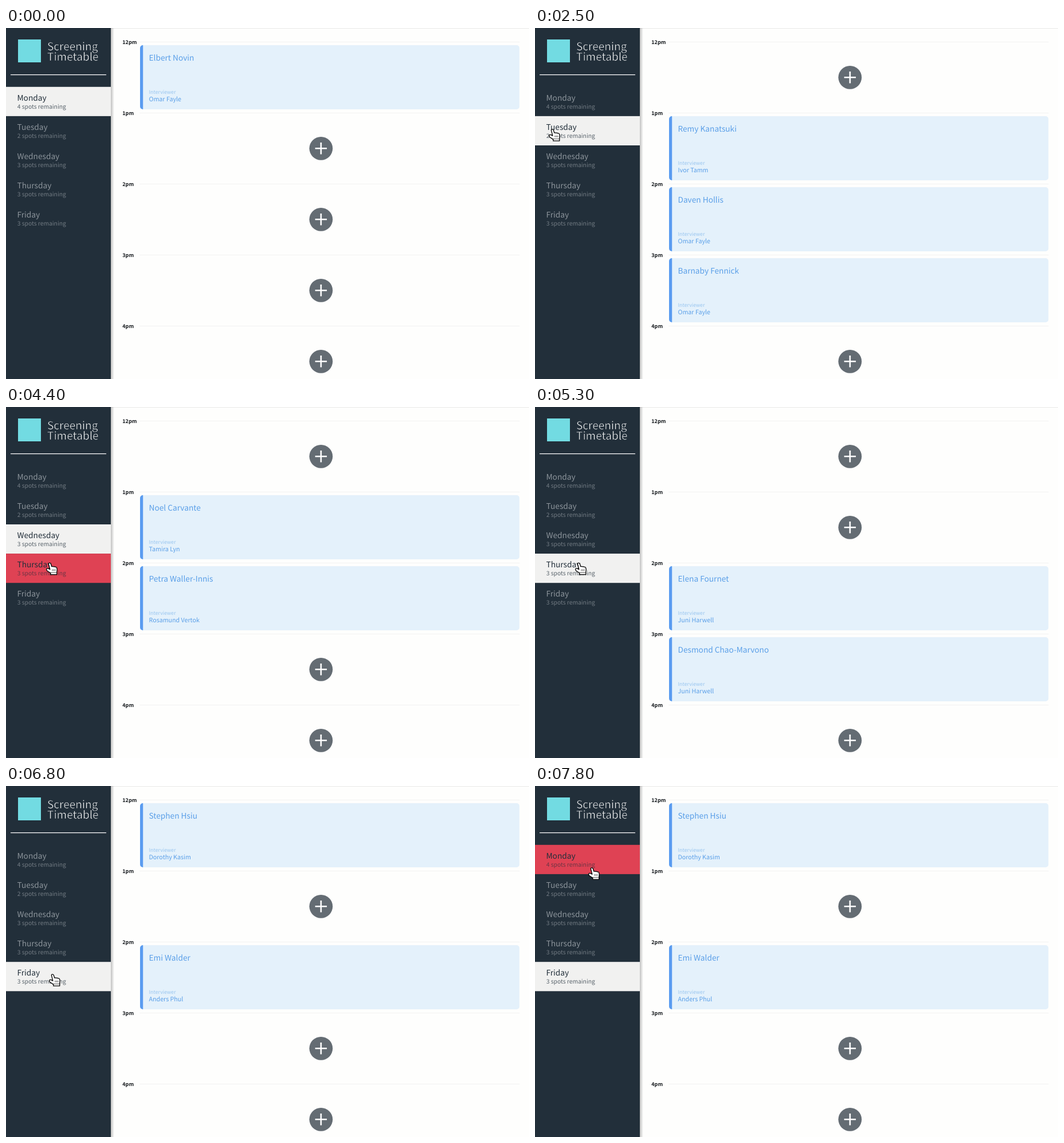
Write an HTML page that moves like this. It is 913 by 613 pixels and loops after 8 s.

```html
<!DOCTYPE html>
<html lang="en">
<head>
<meta charset="utf-8">
<title>Screening Timetable</title>
<style>
  html, body { margin: 0; width: 100%; height: 100%; overflow: hidden; background: #fefefd; }
  svg { display: block; width: 100vw; height: 100vh; }
  text {
    font-family: "Noto Sans CJK JP", "Noto Sans CJK SC", "Noto Sans CJK KR", "Noto Sans CJK", "Noto Sans", sans-serif;
    text-rendering: geometricPrecision;
  }
  .title { font-size: 19px; font-weight: 300; fill: #fff; stroke: #222f3a; stroke-width: .6px; }
  .hour { font-size: 9px; font-weight: 700; fill: #14181c; }
  .name { font-size: 13.7px; fill: #5a9fe8; }
  .label { font-size: 8.8px; font-weight: 300; fill: #98c5ef; }
  .host { font-size: 10.7px; fill: #5a9fe8; }
  .day { font-size: 13.7px; fill: #8c949b; }
  .spots { font-size: 10.3px; font-weight: 300; fill: #727b83; }
  .box { fill: none; }
  .hover .box { fill: #df4254; }
  .hover .day { fill: #222f3a; }
  .hover .spots { fill: #6c3544; }
  .selected .box { fill: #f1f1f0; }
  .selected .day { fill: #222f3a; }
  .selected .spots { fill: #59636b; }
</style>
</head>
<body>
<svg viewBox="0 0 913 613" preserveAspectRatio="none">
  <defs>
    <linearGradient id="shade">
      <stop offset="0" stop-color="#000" stop-opacity=".24"/>
      <stop offset="1" stop-color="#000" stop-opacity="0"/>
    </linearGradient>
    <clipPath id="round"><rect x="234" width="662.3" height="112" rx="5"/></clipPath>
    <g id="add">
      <circle r="20.4" fill="#646c73"/>
      <path d="M-10.2 0H10.2M0-10.2V10.2" stroke="#fff" stroke-width="2.6"/>
    </g>
  </defs>
  <rect width="913" height="613" fill="#fefefd"/>
  <rect width="913" height="1" fill="#e8e8e8"/>
  <g id="hours"></g>
  <g id="schedules"></g>
  <rect x="183" width="6" height="613" fill="url(#shade)"/>
  <rect width="183" height="613" fill="#222f3a"/>
  <rect x="21" y="20" width="40" height="40" fill="#72dbe2"/>
  <text class="title" x="72" y="38.6">Screening</text>
  <text class="title" x="72" y="57">Timetable</text>
  <path d="M8 81.6H175" stroke="#fff" stroke-width="1.3"/>
  <g id="days"></g>
  <g id="cursor" stroke="#000" stroke-linejoin="round" stroke-linecap="round">
    <path fill="#fff" stroke-width="1.3" d="M4.4 2.6Q4.2 1 5.9 .8Q7.6 .7 8.2 2.3L9.8 7.2Q11.4 6.3 12.8 7.5Q14.4 6.7 15.7 8Q17.8 7.4 18.7 9.5Q19.6 12 18.9 15L18.7 21.2H7.8V18.6L1.6 14.5Q.1 12.6 .9 11Q2 9.8 3.9 10.7L6.8 12.2Z"/>
    <path fill="none" stroke-width=".7" d="M7.8 17.7H18.6M11 12.2V14.6M13.4 12.2V14.6M15.8 12.2V14.6"/>
  </g>
</svg>
<script>
const $ = id => document.getElementById(id);
const HOUR = 124, ITEM = 51.1, TOP = 102.8;
const text = (cls, x, y, s) => `<text class="${cls}" x="${x}" y="${y}">${s}</text>`;

// Each day: name, free spots, and bookings as [slot, guest, interviewer].
const week = [
  ["Monday", 4, [[0, "Elbert Novin", "Omar Fayle"]]],
  ["Tuesday", 2, [[1, "Remy Kanatsuki", "Ivor Tamm"], [2, "Daven Hollis", "Omar Fayle"], [3, "Barnaby Fennick", "Omar Fayle"]]],
  ["Wednesday", 3, [[1, "Noel Carvante", "Tamira Lyn"], [2, "Petra Waller-Innis", "Rosamund Vertok"]]],
  ["Thursday", 3, [[2, "Elena Fournet", "Juni Harwell"], [3, "Desmond Chao-Marvono", "Juni Harwell"]]],
  ["Friday", 3, [[0, "Stephen Hsiu", "Dorothy Kasim"], [2, "Emi Walder", "Anders Phul"]]]
];

const card = (guest, host) => `<g clip-path="url(#round)">
  <rect x="234" width="663" height="113" fill="#e4f1fb"/><rect x="234" width="5.2" height="113" fill="#5a9cf0"/></g>`
  + text("name", 249.5, 26.7, guest) + text("label", 249.5, 84.6, "Interviewer") + text("host", 249.5, 97.8, host);

function slot(i, bookings) {
  const booked = bookings.find(b => b[0] === i);
  return booked
    ? `<g transform="translate(0 ${30 + i * HOUR})">${card(booked[1], booked[2])}</g>`
    : `<use href="#add" x="549.9" y="${86.3 + i * HOUR}"/>`;
}

const slots = [0, 1, 2, 3, 4];
$("hours").innerHTML = slots.map(i =>
  text("hour", 203.3, 28 + i * HOUR, `${i || 12}pm`) +
  `<rect x="233" y="${24 + i * HOUR}" width="663.5" height="1" fill="#f2f2f2"/>`).join("");
$("schedules").innerHTML = week.map(d => `<g>${slots.map(i => slot(i, d[2])).join("")}</g>`).join("");
$("days").innerHTML = week.map(([name, free], i) => `<g transform="translate(0 ${TOP + i * ITEM})">
  <rect class="box" width="183" height="${ITEM}"/>
  ${text("day", 19.5, 24.2, name)}${text("spots", 19.7, 38.3, `${free} spots remaining`)}</g>`).join("");

// Pointer moves: start, end, target x, target y.
const moves = [
  [1300, 1400, 24, 176], [2800, 3100, 51, 220], [3200, 3300, 58, 214],
  [3800, 4400, 70, 271.5], [5300, 5600, 75, 328], [7000, 7800, 93, 142]
];
const clicks = [2500, 3700, 5300, 6800];

function pointer(t) {
  let x = 15, y = 177;
  for (const [start, end, toX, toY] of moves) {
    const p = Math.min(1, Math.max(0, (t - start) / (end - start)));
    const e = p * p * (3 - 2 * p);
    x += (toX - x) * e;
    y += (toY - y) * e;
  }
  return [x, y];
}

function draw(now) {
  const t = Math.floor(now % 8000 / 100) * 100;
  const [x, y] = pointer(t);
  const shown = t >= 1200;
  const selected = clicks.filter(c => t >= c).length;
  const hovered = shown ? Math.floor((y + 1 - TOP) / ITEM) : -1;
  $("cursor").style.display = shown ? "" : "none";
  $("cursor").setAttribute("transform", `translate(${x} ${y})`);
  week.forEach((_, i) => {
    $("days").children[i].setAttribute("class", i === selected ? "selected" : i === hovered ? "hover" : "");
    $("schedules").children[i].style.display = i === selected ? "" : "none";
  });
}

const begin = performance.now();
function tick() {
  draw(performance.now() - begin);
  requestAnimationFrame(tick);
}
tick();
</script>
</body>
</html>
```
